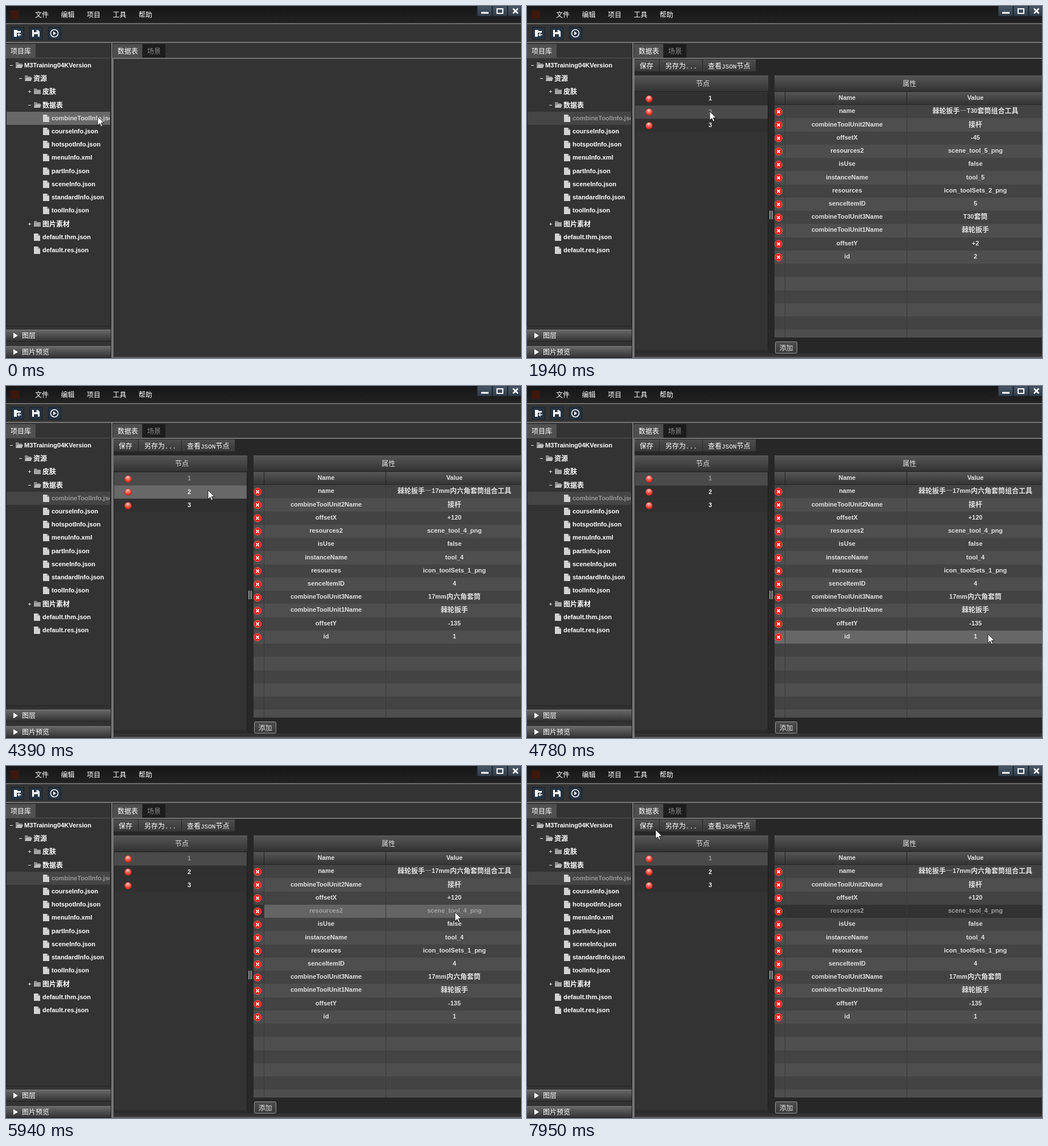
Animation, 905 px wide and 619 px high, one loop 8000 ms. Source, as an HTML page:

```html
<!DOCTYPE html>
<html lang="zh-CN">
<head>
<meta charset="utf-8">
<title>Data table editor</title>
<style>
html, body { margin: 0; width: 100%; height: 100%; overflow: hidden; background: #333; }
svg { display: block; width: 905px; height: 619px; }
text { font: bold 11px "Liberation Sans", Arial, sans-serif; fill: #fff; white-space: pre; }
.plain { font-weight: 400; }
.cjk { font-family: "Noto Sans CJK SC", "Noto Sans CJK", sans-serif; font-size: 12px; }
.mono { font-family: "Liberation Mono", monospace; font-size: 11px; }
.mid { text-anchor: middle; }
.soft { fill: #e2e2e2; }
.val .cjk { baseline-shift: -1px; }
</style>
</head>
<body>
<svg id="stage" viewBox="0 0 905 619" xmlns="http://www.w3.org/2000/svg">
  <defs>
    <linearGradient id="title" x2="0" y2="1"><stop stop-color="#161616"/><stop offset="1" stop-color="#222"/></linearGradient>
    <linearGradient id="head" x2="0" y2="1"><stop stop-color="#565656"/><stop offset="1" stop-color="#323232"/></linearGradient>
    <linearGradient id="bar" x2="0" y2="1"><stop stop-color="#6a6a6a"/><stop offset="1" stop-color="#343434"/></linearGradient>
    <linearGradient id="btn" x2="0" y2="1"><stop stop-color="#4e4e4e"/><stop offset="1" stop-color="#383838"/></linearGradient>
    <linearGradient id="win" x2="0" y2="1"><stop stop-color="#4a5868"/><stop offset="1" stop-color="#303b48"/></linearGradient>
    <radialGradient id="ball" cx=".45" cy=".25" r=".75"><stop stop-color="#ffd0c4"/><stop offset=".5" stop-color="#f4604e"/><stop offset="1" stop-color="#d81c10"/></radialGradient>
    <clipPath id="treeClip"><rect x="0" y="93" width="182" height="468"/></clipPath>
    <g id="file"><path d="M0 0h7l4 4v9h-11z" fill="#d2d2d2"/><path d="M7 0v4h4z" fill="#8c8c8c"/></g>
    <g id="shut"><path d="M0 1h5l1 2h6v8h-12z" fill="#8a8a8a"/><path d="M0 4h12v7h-12z" fill="#a4a4a4"/></g>
    <g id="open"><path d="M0 1h5l1 2h5v8h-11z" fill="#8a8a8a"/><path d="M3 5h10l-2 6h-11z" fill="#bcbcbc"/></g>
    <g id="del"><circle r="6.5" fill="#ee1a12" stroke="#f8685c"/><path d="M-2.5 -2.5L2.5 2.5M2.5 -2.5L-2.5 2.5" stroke="#fff" stroke-width="1.8"/></g>
  </defs>
  <g id="shell"></g>
  <g id="work"></g>
  <path id="cursor" d="M0 0V16L3.7 12.6L6.2 18L8.6 17L6.2 11.6H11.2Z" fill="#fff" stroke="#111" stroke-width=".9"/>
</svg>
<script>
const $ = id => document.getElementById(id);
const LOOP = 8000, PITCH = 23.25;

// ---------- drawing helpers ----------
const rect = (x, y, w, h, fill, more = '') =>
  `<rect x="${x}" y="${y}" width="${w}" height="${h}" fill="${fill}" ${more}/>`;
const path = (d, more) => `<path d="${d}" ${more}/>`;
const use = (id, x, y) => `<use href="#${id}" x="${x}" y="${y}"/>`;
const mix = s => s.replace(/[\u2014\u4e00-\u9fff]+/g, m => `<tspan class="cjk">${m}</tspan>`);
const text = (x, y, s, cls = '', more = '') =>
  `<text x="${x}" y="${y}" class="${cls}" ${more}>${mix(s)}</text>`;
const rowY = i => Math.round(174.2 + PITCH * i);

// ---------- window frame and project tree ----------
const tree = [
  [0, '-', 'M3Training04KVersion'], [1, '-', '资源'], [2, '+', '皮肤'], [2, '-', '数据表'],
  ...['combineToolInfo.json', 'courseInfo.json', 'hotspotInfo.json', 'menuInfo.xml', 'partInfo.json',
    'sceneInfo.json', 'standardInfo.json', 'toolInfo.json'].map(n => [3, '', n]),
  [2, '+', '图片素材'], [2, '', 'default.thm.json'], [2, '', 'default.res.json']
];

function treeRow([level, sign, name], i) {
  const x = 17 + level * 16, y = Math.round(108 + 23.21 * i), sx = x - 7.5, sy = y - 3.5;
  let s = '';
  if (sign) s += path(`M${sx - 2.5} ${sy}h5` + (sign == '+' ? `M${sx} ${sy - 2.5}v5` : ''), 'stroke="#ddd"');
  s += sign ? use(sign == '-' ? 'open' : 'shut', x, y - 10) : use('file', x, y - 10);
  return s + text(x + 15, y + (/^[a-z]/i.test(name) ? 0 : .5), name, '', i == 4 ? 'id="treeText"' : '');
}

function accordion(y, label) {
  return rect(0, y, 184, 20, 'url(#bar)') + rect(0, y, 184, 1, '#777') + rect(0, y + 20, 184, 1, '#222') +
    path(`M13 ${y + 5.5}l8 5l-8 5z`, 'fill="#fff"') + text(28, y + 15, label, 'plain');
}

function shell() {
  let s = rect(0, 0, 905, 30, 'url(#title)') + rect(0, 30, 905, 2, '#6c6c6c') + rect(0, 32, 905, 31, '#333');
  s += rect(8, 8, 15, 15, '#3e170d');
  ['文件', '编辑', '项目', '工具', '帮助'].forEach((m, i) => s += text(51 + 45.5 * i, 19.5, m, 'plain'));

  [[828, 26], [855, 26], [882, 23]].forEach(([x, w]) => s += rect(x, 0, w, 18, 'url(#win)', 'stroke="#1a222b" stroke-width=".8"'));
  s += rect(835, 10.5, 13, 3, '#fff') + rect(863, 5, 10, 8, 'none', 'stroke="#fff" stroke-width="2"') +
    path('M891 4.5l8.5 8.5M899.5 4.5l-8.5 8.5', 'stroke="#fff" stroke-width="2.5"');

  [9, 41, 74].forEach(x => s += rect(x + .5, 37.5, 22, 21, '#263443', 'stroke="#17212c"'));
  s += path('M14 42h5l2 2h5v3h-7v7h-5z', 'fill="#fff"') +
    path('M27 50.5h-6m2.5 -2.5l-2.5 2.5l2.5 2.5', 'fill="none" stroke="#fff" stroke-width="1.6"');
  s += path('M46 42h10l3 3v9h-13z', 'fill="#fff"') + rect(49, 42, 6, 4, '#263443') + rect(49, 49.5, 7, 4.5, '#263443') + rect(53, 42.5, 1.5, 3, '#fff');
  s += '<circle cx="85" cy="48" r="6.5" fill="none" stroke="#fff" stroke-width="1.5"/>' + path('M83 44.5l5 3.5l-5 3.5z', 'fill="#fff"');

  s += rect(0, 63, 905, 2, '#757575') + rect(0, 65, 905, 554, '#333');
  s += rect(0, 67, 52, 25, '#505050') + text(8, 83.5, '项目库', 'plain') + rect(52, 91, 132, 1, '#585858');
  s += rect(188, 67, 51, 25, '#4e4e4e') + text(196, 83.5, '数据表', 'plain');
  s += rect(240, 67, 40, 24, '#1c1c1c') + text(248, 83.5, '场景', 'plain', 'style="fill:#8a8a8a"');
  s += rect(0, 92, 1, 471, '#222') + rect(183, 92, 1, 471, '#272727') + rect(0, 562, 184, 1, '#202020');
  s += rect(184, 65, 1, 554, '#222') + rect(185, 65, 2, 554, '#777');
  s += rect(187, 91, 718, 2, '#757575') + rect(187, 92, 2, 527, '#757575') + rect(187, 617, 718, 1.5, '#6a6a6a');
  s += rect(1, 186, 182, 23, '#666', 'id="treeRow"');
  s += `<g clip-path="url(#treeClip)">${tree.map(treeRow).join('')}</g>`;
  return s + accordion(569, '图层') + accordion(598, '图片预览');
}

// ---------- data panels ----------
const names = ['name', 'combineToolUnit2Name', 'offsetX', 'resources2', 'isUse', 'instanceName', 'resources',
  'senceItemID', 'combineToolUnit3Name', 'combineToolUnit1Name', 'offsetY', 'id'];
const record = (id, name, unit2, x, unit3, unit1, y) => [name, unit2, x, `scene_tool_${id + 3}_png`, 'false',
  `tool_${id + 3}`, `icon_toolSets_${id}_png`, `${id + 3}`, unit3, unit1, y, `${id}`];
const records = [
  record(1, '棘轮扳手—17mm内六角套筒组合工具', '接杆', '+120', '17mm内六角套筒', '棘轮扳手', '-135'),
  record(2, '棘轮扳手—T30套筒组合工具', '接杆', '-45', 'T30套筒', '棘轮扳手', '+2'),
  record(3, '扭力扳手—22mm扳手组合工具', '', '+300', '22mm扳手头', '扭力扳手', '+2')
];

function nodePanel() {
  let s = rect(189, 122, 235, 29, 'url(#head)') + text(309, 141, '节点', 'plain mid soft');
  s += rect(190, 151, 233, 454, '#333') + rect(189, 150, 235, 1, '#222') + rect(423, 151, 1, 455, '#1e1e1e') + rect(189, 605, 235, 6, '#2b2b2b');
  s += '<g id="nodes">';
  for (let i = 0; i < 3; i++) {
    const y = Math.round(152 + PITCH * i);
    s += rect(190, y, 233, 23, '#303030', `id="node${i}"`) +
      `<circle cx="214.5" cy="${y + 11.5}" r="6" fill="url(#ball)" stroke="#b8281c" stroke-width=".8"/>` +
      text(322, Math.round(166.4 + PITCH * i), `${i + 1}`, 'mid', `id="num${i}"`);
  }
  return s + '</g>';
}

function propPanel() {
  let s = rect(435, 122, 470, 28, 'url(#head)') + text(672, 141, '属性', 'plain mid soft');
  s += rect(435, 150, 470, 1, '#222') + rect(435, 151, 470, 23, 'url(#head)') + rect(435, 173, 470, 1, '#282828');
  s += text(562.5, 165, 'Name', 'mid soft') + text(788, 165, 'Value', 'mid soft');
  for (let i = 0; i < 18; i++) {
    const y = rowY(i), h = Math.min(rowY(i + 1), 583) - y, fill = stripe(i);
    s += rect(435, y, 19, h, fill, `id="cell${i}"`) + rect(454, y, 451, h, fill, `id="row${i}"`);
  }
  [453, 667].forEach(x => s += rect(x, 151, 1, 23, '#222') + rect(x, 174, 1, 409, '#3a3a3a'));
  s += '<g id="props">';
  names.forEach((n, i) => {
    const y = Math.round(188.4 + 23.22 * i);
    s += use('del', 442, 186 + PITCH * i) + text(562.5, y, n, 'mid soft', `id="name${i}"`) + text(788, y, '', 'mid soft val', `id="val${i}"`);
  });
  s += '</g>';
  s += '<g id="editor">' + rect(667, 1, 235, 25, '#484848', 'stroke="#8e8e8e" stroke-width="2"') +
    rect(737, 5, 98, 15, '#b2d3fa', 'id="mark"') + text(786.5, 16, '', 'mid', 'id="edit" style="fill:#111"') + '</g>';
  return s + rect(436.5, 590.5, 38, 20, 'url(#btn)', 'rx="2" stroke="#989898"') + text(455.5, 605.5, '添加', 'plain mid soft');
}

function work() {
  let s = rect(189, 93, 716, 518, '#272727');
  [[189, 43], [233, 75], [309, 93]].forEach(([x, w]) => s += rect(x, 94, w, 21, 'url(#btn)'));
  s += text(198, 109.5, '保存', 'plain') + text(243, 109.5, '另存为<tspan class="mono">...</tspan>', 'plain') +
    text(318, 109.5, '查看<tspan class="mono">JSON</tspan>节点', 'plain');
  s += nodePanel() + propPanel();
  [426.5, 429, 431.5].forEach(x => s += rect(x - .5, 360, 1, 15, '#c4c4c4'));
  return s;
}

// ---------- timeline ----------
const events = [
  [0, { tree: 'over', stage: 0, node: -1, nodeDown: false, data: 0, prop: -1, propDown: false, edit: false }],
  [70, { tree: 'down' }], [240, { tree: 'on' }],
  [470, { stage: 1 }], [550, { stage: 2 }], [630, { stage: 3 }], [710, { node: 0 }],
  [1770, { node: 1, nodeDown: true }], [1940, { nodeDown: false, data: 1 }],
  [2460, { node: 2, nodeDown: true }], [2560, { nodeDown: false, data: 2 }],
  [4240, { node: 0, nodeDown: true }], [4310, { nodeDown: false, data: 0 }],
  [4860, { prop: 11, propDown: true }], [4930, { propDown: false, edit: true }],
  [5940, { prop: 3, propDown: true, edit: false }], [6040, { propDown: false, edit: true }],
  [7330, { edit: false }]
];

const trail = [[0, 161, 194]];
// The pointer is sampled in n even steps between two times.
function move(t0, t1, n, x, y) {
  const [, x0, y0] = trail[trail.length - 1];
  for (let i = 1; i <= n; i++) {
    const k = (1 - Math.cos(Math.PI * i / n)) / 2;
    const t = n > 1 ? t0 + (t1 - t0) * (i - 1) / (n - 1) : t0;
    trail.push([t, Math.round(x0 + (x - x0) * k), Math.round(y0 + (y - y0) * k)]);
  }
}
move(930, 1160, 4, 319, 187);
move(1390, 1470, 2, 321, 185);
move(2000, 2080, 2, 321, 198);
move(2230, 2230, 1, 321, 200);
move(3400, 3400, 1, 323, 192);
move(3470, 3860, 6, 322, 165);
move(4390, 4780, 6, 810, 436);
move(5100, 5790, 10, 789, 257);
move(6120, 6120, 1, 790, 247);
move(6490, 7030, 8, 267, 176);
move(7180, 7260, 2, 262, 160);
move(7560, 7950, 6, 226, 112);

function stripe(i) { return i % 2 ? '#4e4e4e' : '#434343'; }
const show = (id, on) => $(id).style.display = on ? '' : 'none';
const fill = (id, c) => $(id).setAttribute('fill', c);
const ink = (id, c) => $(id).style.fill = c;

function draw(t) {
  const s = {};
  for (const [at, patch] of events) if (at <= t) Object.assign(s, patch);
  const [, x, y] = trail.filter(p => p[0] <= t).pop();
  $('cursor').setAttribute('transform', `translate(${x} ${y})`);

  fill('treeRow', s.tree == 'on' ? '#454545' : '#686868');
  ink('treeText', s.tree == 'over' ? '#dcdcdc' : '#989898');
  show('work', s.stage > 0);
  show('nodes', s.stage > 1);
  show('props', s.stage > 2);

  const overNode = x >= 190 && x < 423 && y >= 152 ? Math.floor((y - 151.7) / PITCH) : -1;
  for (let i = 0; i < 3; i++) {
    const on = s.node == i;
    fill('node' + i, on && !s.nodeDown ? '#4a4a4a' : on || overNode == i ? '#686868' : '#303030');
    ink('num' + i, on ? '#999' : '#eee');
  }

  const overProp = x >= 435 && y >= 174 ? Math.floor((y - 173.7) / PITCH) : -1;
  names.forEach((n, i) => {
    const on = s.prop == i, base = on ? '#323232' : overProp == i ? '#676767' : stripe(i);
    fill('cell' + i, base);
    fill('row' + i, on && s.propDown ? '#646464' : base);
    const c = on ? '#a2a2a2' : '';
    ink('name' + i, c);
    ink('val' + i, c);
    $('val' + i).innerHTML = mix(records[s.data][i]);
  });

  show('editor', s.edit);
  if (s.edit) {
    $('editor').setAttribute('transform', `translate(0 ${rowY(s.prop) - 2})`);
    $('edit').textContent = records[s.data][s.prop];
    const w = Math.round($('edit').getComputedTextLength()) + 1;
    $('mark').setAttribute('width', w);
    $('mark').setAttribute('x', 786.5 - w / 2);
  }
}

$('shell').innerHTML = shell();
$('work').innerHTML = work();

const marks = [...events, ...trail].map(e => e[0]);
const start = performance.now();
let last = -1;
function tick() {
  const t = (performance.now() - start) % LOOP;
  const now = Math.max(...marks.filter(m => m <= t));
  if (now !== last) draw(last = now);
  requestAnimationFrame(tick);
}
tick();
</script>
</body>
</html>
```
